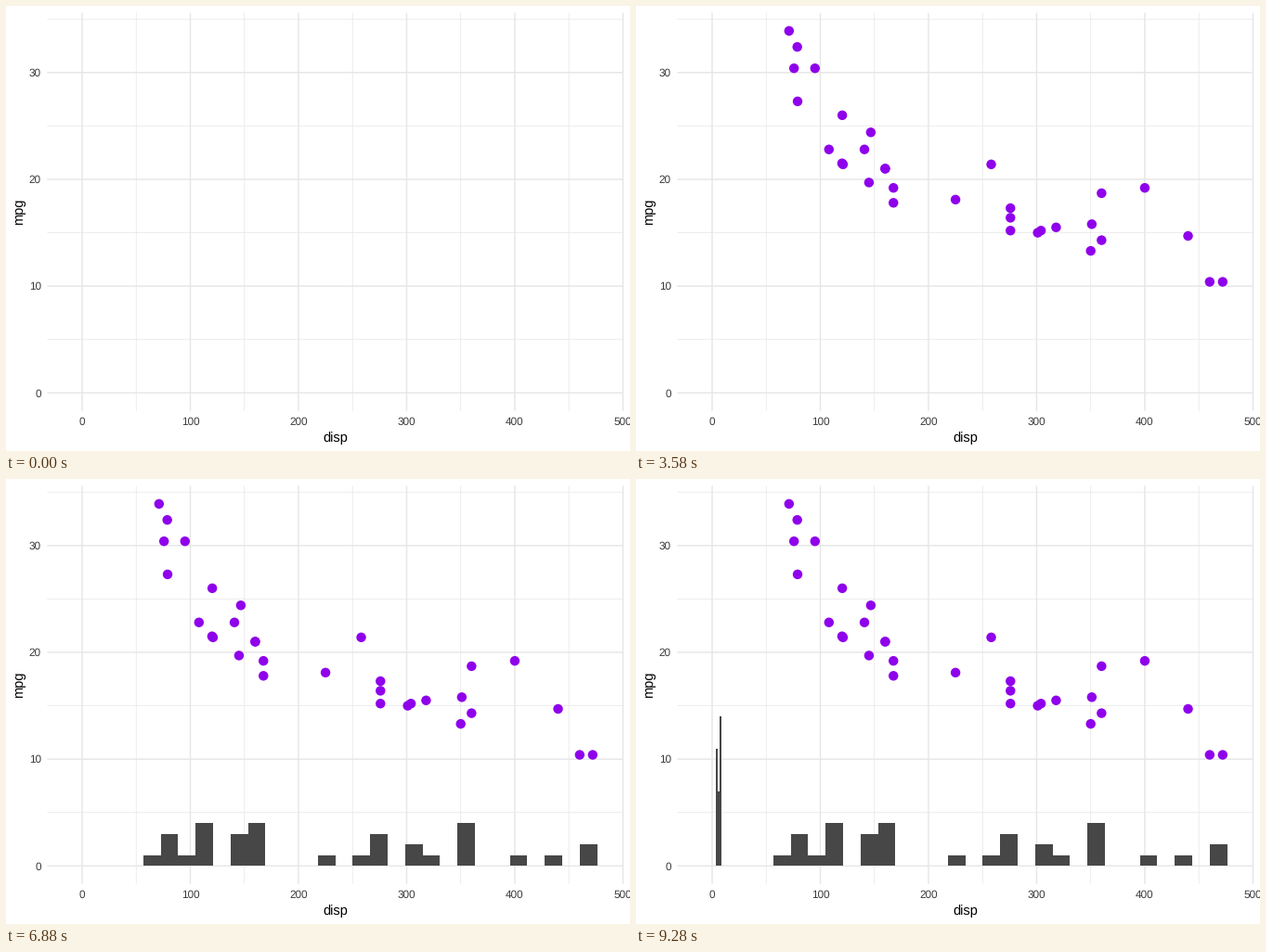
A matplotlib script that plays this animation: 672x480 px, repeating every 10 s.

```python
import numpy as np
import matplotlib.pyplot as plt
from matplotlib.animation import FuncAnimation
from matplotlib.patches import Circle, Rectangle

plt.rcParams.update({"font.family": "Liberation Sans", "text.hinting": "none"})

WIDTH, HEIGHT, DPI = 672, 480, 96
LOOP_MS, STEP_MS = 10000, 100
POINTS_MS, HISTOGRAM_MS, COUNTS_MS = 1600, 4900, 8200

GRID, LABEL, BAR, POINT = "#e6e6e6", "#3c3c3c", "#474747", "#8f00eb"
LEFT, RIGHT, TOP, BOTTOM = 44.4, 664.75, 7.33, 436.85

mpg = [21, 21, 22.8, 21.4, 18.7, 18.1, 14.3, 24.4, 22.8, 19.2, 17.8,
       16.4, 17.3, 15.2, 10.4, 10.4, 14.7, 32.4, 30.4, 33.9, 21.5,
       15.5, 15.2, 13.3, 19.2, 27.3, 26, 30.4, 15.8, 19.7, 15, 21.4]
disp = [160, 160, 108, 258, 360, 225, 360, 146.7, 140.8, 167.6, 167.6,
        275.8, 275.8, 275.8, 472, 460, 440, 78.7, 75.7, 71.1, 120.1,
        318, 304, 350, 400, 79, 120.3, 95.1, 351, 145, 301, 121]
cylinders = {4: 11, 6: 7, 8: 14}

# Bin width comes from the shared x range, 4 to 472.
BIN = (472 - 4) / 29
edges = (np.arange(31) - 0.5) * BIN
PAD = 0.05
X_MIN = edges[0] - PAD * 30 * BIN
X_MAX = edges[-1] + PAD * 30 * BIN
Y_MIN, Y_MAX = -PAD * 33.9, (1 + PAD) * 33.9


def px(x):
    return LEFT + (x - X_MIN) / (X_MAX - X_MIN) * (RIGHT - LEFT)


def py(y):
    return BOTTOM - (y - Y_MIN) / (Y_MAX - Y_MIN) * (BOTTOM - TOP)


fig = plt.figure(figsize=(WIDTH / DPI, HEIGHT / DPI), dpi=DPI, facecolor="white")
ax = fig.add_axes([0, 0, 1, 1])
ax.set(xlim=(0, WIDTH), ylim=(HEIGHT, 0))
ax.axis("off")


def grid(xs, ys, width_px, order):
    style = dict(colors=GRID, linewidths=width_px * 72 / DPI,
                 snap=False, zorder=order)
    ax.vlines([px(x) for x in xs], TOP, BOTTOM, **style)
    ax.hlines([py(y) for y in ys], LEFT, RIGHT, **style)


def bar(x0, x1, count):
    left, right = round(px(x0)), round(px(x1))
    top, base = round(py(count)), round(py(0))
    return ax.add_patch(Rectangle((left, top), right - left, base - top,
                                  fc=BAR, lw=0, antialiased=False, zorder=4))


x_ticks, y_ticks = range(0, 501, 100), range(0, 31, 10)
grid(range(50, 500, 100), range(5, 36, 10), 0.71, 1)
grid(x_ticks, y_ticks, 1.42, 2)

for x in x_ticks:
    ax.text(px(x), 452, str(x), size=8.8, color=LABEL, ha="center", va="baseline")
for y in y_ticks:
    ax.text(37.8, py(y) + 4.2, str(y), size=8.8, color=LABEL,
            ha="right", va="baseline")
ax.text((LEFT + RIGHT) / 2, 469.8, "disp", size=11, ha="center", va="baseline")
ax.text(17.8, (TOP + BOTTOM) / 2, "mpg", size=11, rotation=90,
        rotation_mode="anchor", ha="center", va="baseline")

points = [ax.add_patch(Circle((px(x), py(y)), 5.21, fc=POINT, lw=0, zorder=3))
          for x, y in zip(disp, mpg)]
counts, _ = np.histogram(disp, edges)
histogram = [bar(a, b, n) for a, b, n in zip(edges, edges[1:], counts) if n]
cylinder_bars = [bar(c - 0.9, c + 0.9, n) for c, n in cylinders.items()]
layers = [(POINTS_MS, points), (HISTOGRAM_MS, histogram),
          (COUNTS_MS, cylinder_bars)]


def draw(frame):
    now = frame * STEP_MS
    for start, artists in layers:
        for artist in artists:
            artist.set_visible(now >= start)
    return [artist for _, artists in layers for artist in artists]


anim = FuncAnimation(fig, draw, frames=LOOP_MS // STEP_MS, interval=STEP_MS,
                     repeat=True, repeat_delay=0)
plt.show()
```
